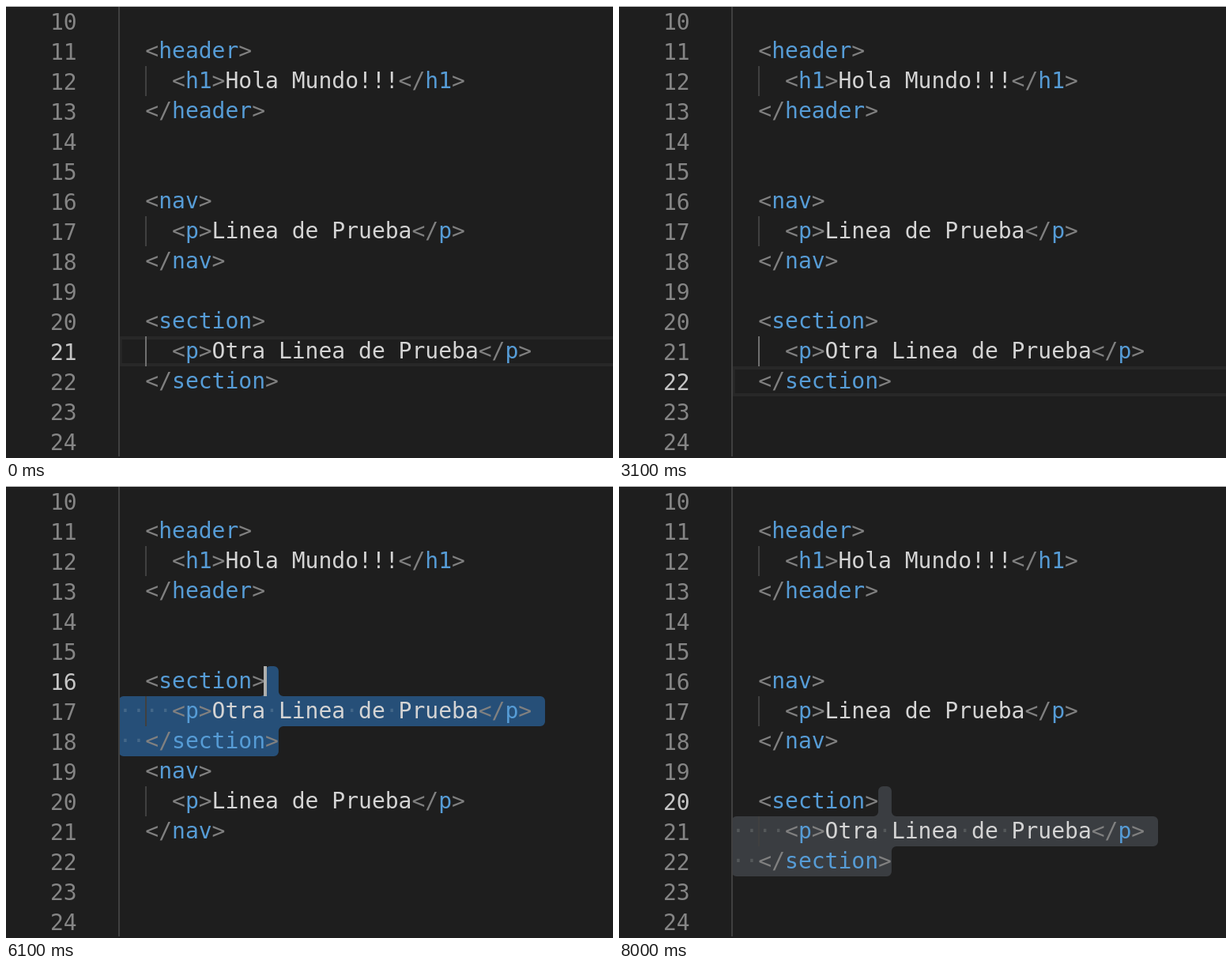
An HTML page with a canvas that plays this animation: 768x572 px, repeating every 8.7 s.

```html
<!DOCTYPE html>
<html lang="es">
<head>
<meta charset="utf-8">
<title>Mover líneas en el editor</title>
<style>
  html, body { margin: 0; overflow: hidden; background: #1e1e1e; }
  canvas { display: block; }
</style>
</head>
<body>
<canvas id="stage" width="768" height="572"></canvas>
<script>
const ctx = document.getElementById('stage').getContext('2d');
const LOOP = 8700, FIRST = 10, ROW = 38, LEFT = 142.6, CHAR = 16.857;
const MOVE_DOWN = 2600, SELECT = 3600, SELECT_ALL = 3900, BLUR = 8000;

const code = ['', '<header>', '<h1>Hola Mundo!!!</h1>', '</header>', '', '',
  '<nav>', '<p>Linea de Prueba</p>', '</nav>', '',
  '<section>', '<p>Otra Linea de Prueba</p>', '</section>', '', ''];

// [time, cursor row] for every key press; each one restarts the blinking
const keys = [[-900, 21], [500, 20], [700, 19], [900, 18],
  [1700, 19], [1900, 20], [2100, 21], [2600, 22], [3600, 21], [3900, 20],
  [4600, 19], [4800, 18], [5000, 17], [5200, 16], [5400, 15],
  [6100, 16], [6300, 17], [6500, 18], [6700, 19], [6800, 20]];

const colX = col => LEFT + col * CHAR;
const rowY = row => (row - FIRST) * ROW;

// Moves a block of lines and indents everything by tag nesting
function layout(from, count, to) {
  const lines = code.slice();
  const block = lines.splice(from - FIRST, count);
  lines.splice(to - FIRST, 0, ...block);
  let depth = 1;
  return lines.map(text => {
    if (text.startsWith('</')) depth--;
    const line = { depth, text: text && '  '.repeat(depth) + text };
    if (/^<\w+>$/.test(text)) depth++;
    return line;
  });
}

function fillRect(color, x, y, w, h) {
  ctx.fillStyle = color;
  ctx.fillRect(x, y, w, h);
}

function drawChars(text, x, y, colorAt) {
  [...text].forEach((ch, i) => {
    if (ch === ' ') return;
    ctx.fillStyle = colorAt(i);
    ctx.fillText(ch, x + i * CHAR, y);
  });
}

function drawCode(text, y) {
  let col = 0;
  for (const token of text.match(/<\/?|>|\w+(?=>)|[^<>]+/g) || []) {
    const isTag = /<\/?$/.test(text.slice(0, col));
    const color = /^[<>]/.test(token) ? '#808080' : isTag ? '#569cd6' : '#d4d4d4';
    drawChars(token, colX(col), y, () => color);
    col += token.length;
  }
}

function drawSelection(lines, row, col, endRow, color) {
  const points = [[colX(col), rowY(row)]];
  for (let r = row; r <= endRow; r++) {
    const right = colX(lines[r - FIRST].text.length + (r < endRow ? 1 : 0));
    points.push([right, rowY(r)], [right, rowY(r + 1)]);
  }
  points.push([LEFT, rowY(endRow + 1)], [LEFT, rowY(row + 1)], [colX(col), rowY(row + 1)]);

  ctx.beginPath();
  ctx.moveTo(points[0][0], points[0][1] + ROW / 2);
  points.forEach((p, i) => ctx.arcTo(...p, ...points[(i + 1) % points.length], 6));
  ctx.closePath();
  ctx.fillStyle = color;
  ctx.fill();

  for (let r = row; r <= endRow; r++) {
    const start = r === row ? col : 0;
    const dots = lines[r - FIRST].text.replace(/./g, (ch, i) => ch === ' ' && i >= start ? '·' : ' ');
    drawChars(dots, LEFT, rowY(r) + 28, () => 'rgba(227,228,226,.16)');
  }
}

function drawGuides(lines, anchor) {
  const active = anchor && lines[anchor - FIRST].depth - 1;
  lines.forEach(({ depth }, i) => {
    for (let level = 0; level < depth; level++) {
      const a = anchor - FIRST;
      const bright = anchor && level === active &&
        lines.slice(Math.min(a, i), Math.max(a, i) + 1).every(l => l.depth > level);
      fillRect(bright ? '#707070' : '#404040', Math.floor(colX(level * 2)), i * ROW, 2, ROW);
    }
  });
}

function draw(t) {
  const [pressed, row] = keys.filter(key => key[0] <= t).pop();
  const selecting = t >= SELECT;
  const lines = t < MOVE_DOWN ? layout(21, 1, row)
    : t < SELECT_ALL ? layout(21, 1, 21)
    : layout(20, 3, row);
  const line = lines[row - FIRST];
  const col = t < MOVE_DOWN ? line.depth * 2 + 14 : t < SELECT_ALL ? 12 : line.text.length;

  ctx.font = '28px "DejaVu Sans Mono", monospace';
  fillRect('#1e1e1e', 0, 0, 768, 572);
  if (selecting) {
    const endRow = t < SELECT_ALL ? 22 : row + 2;
    drawSelection(lines, row, col, endRow, t < BLUR ? '#264f78' : '#3a3d41');
  } else {
    ctx.strokeStyle = '#282828';
    ctx.lineWidth = 4;
    ctx.strokeRect(LEFT + 2, rowY(row) + 2, 700, ROW - 4);
  }
  drawGuides(lines, selecting ? 0 : Math.min(row, 21));

  lines.forEach(({ text }, i) => {
    const number = i + FIRST;
    drawChars(String(number), 56, i * ROW + 30, () => number === row ? '#c6c6c6' : '#858585');
    drawCode(text, i * ROW + 28);
  });
  if (t < BLUR && (t - pressed) % 1000 < 500) {
    fillRect('#aeafad', Math.floor(colX(col)) - 2, rowY(row), 4, ROW);
  }
  fillRect('#d0d0d0', 0, 0, 768, 1);
}

function tick() {
  draw(performance.now() % LOOP);
  requestAnimationFrame(tick);
}
tick();
</script>
</body>
</html>
```
